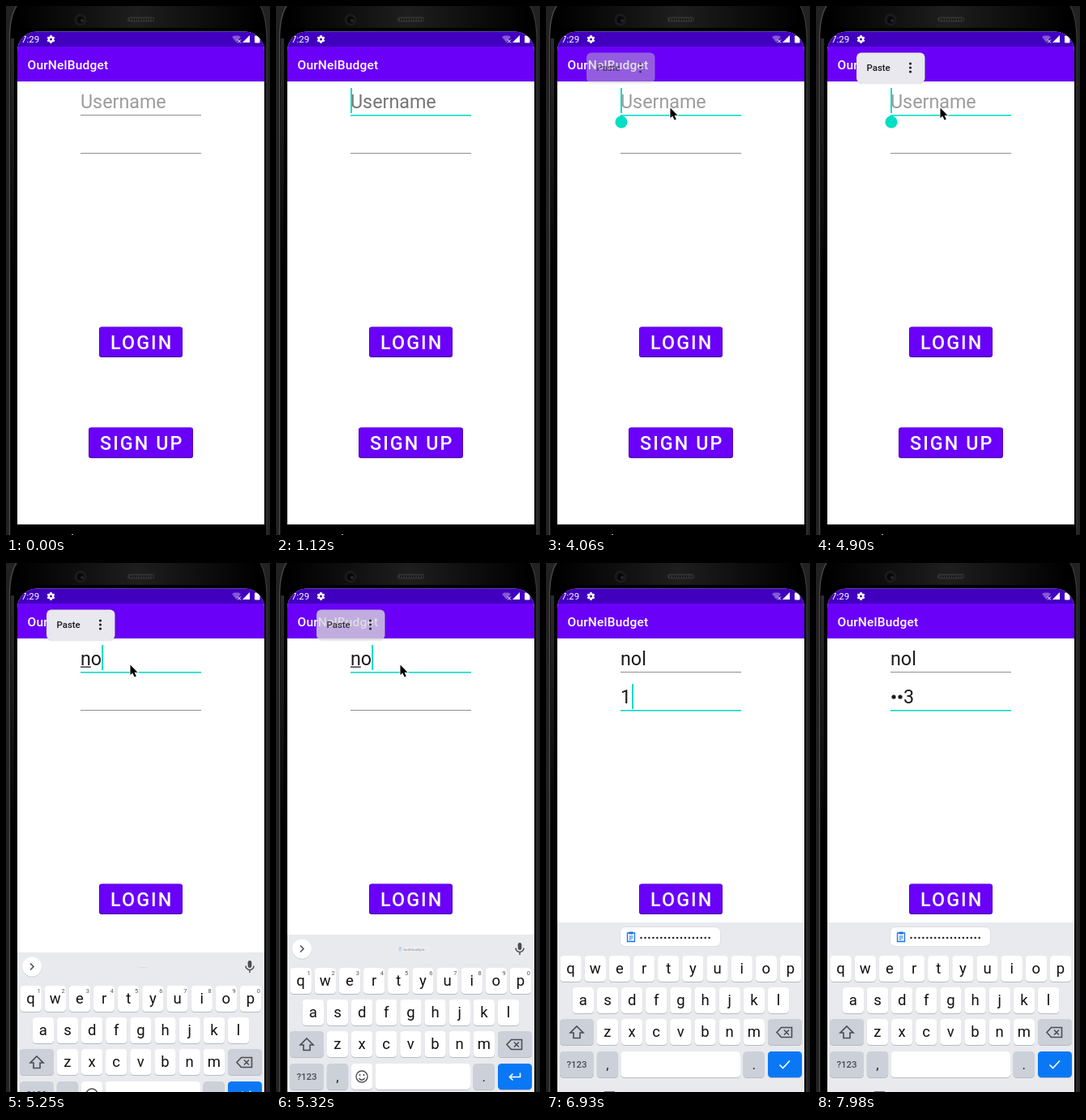
These frames come from a looping animation (326 by 652 pixels, 8 s). An HTML page with a canvas:

```html
<!DOCTYPE html>
<html lang="en">
<head>
<meta charset="utf-8">
<title>Login screen</title>
<style>
html, body { margin: 0; width: 100%; height: 100%; overflow: hidden; background: #000; }
canvas { display: block; }
</style>
</head>
<body>
<canvas id="stage" width="326" height="652"></canvas>
<script>
const ctx = document.getElementById('stage').getContext('2d');
const LOOP = 8000, STEP = 70;
const PURPLE = '#6a00f8', DEEP = '#4100be', TEAL = '#10dac6', INK = '#1c1c1c', GREY = '#8f8f8f';
const FIELD_X = 92, FIELD_END = 241;

const clamp = v => Math.max(0, Math.min(1, v));
const within = (t, a, b) => t >= a && t < b;

function rect(x, y, w, h, color) {
  ctx.fillStyle = color;
  ctx.fillRect(x, y, w, h);
}

function round(x, y, w, h, r, color) {
  ctx.beginPath();
  ctx.roundRect(x, y, w, h, r);
  ctx.fillStyle = color;
  ctx.fill();
}

function disc(x, y, r, color) {
  ctx.beginPath();
  ctx.arc(x, y, r, 0, Math.PI * 2);
  ctx.fillStyle = color;
  ctx.fill();
}

function shape(d, color) {
  ctx.fillStyle = color;
  ctx.fill(new Path2D(d));
}

function stroke(d, color, width = 1.5) {
  ctx.strokeStyle = color;
  ctx.lineWidth = width;
  ctx.stroke(new Path2D(d));
}

function text(str, x, y, size, color, { weight = 400, align = 'left', gap = 0 } = {}) {
  ctx.font = `${weight} ${size}px Roboto, sans-serif`;
  ctx.textAlign = align;
  ctx.letterSpacing = gap + 'px';
  ctx.fillStyle = color;
  ctx.fillText(str, x, y);
  const width = ctx.measureText(str).width;
  ctx.letterSpacing = '0px';
  return width;
}

function fade(x0, y0, x1, y1, ...colors) {
  const g = ctx.createLinearGradient(x0, y0, x1, y1);
  colors.forEach((c, i) => g.addColorStop(i / (colors.length - 1), c));
  return g;
}

function body() {
  rect(0, 0, 326, 652, '#222');
  shape('M13 0 Q5 12 4.5 38 V652 H322 V38 Q321 12 314 0 z', '#000');
  rect(14, 0, 298, 27, fade(14, 0, 312, 0, '#000', '#1e1e1e', '#000'));
  stroke('M13 0 Q5 12 4.5 38 V652', '#484848', 1.4);
  stroke('M314 0 Q321 12 322 38 V652', '#3a3a3a', 1.2);
  rect(6, 40, 4, 290, fade(0, 40, 0, 330, '#2c2c2c', '#000'));
  disc(92, 17, 7.5, '#1b1b1d');
  disc(92, 17, 4.5, '#08080a');
  disc(94, 18, 2, '#25252d');
  round(150, 13.5, 33, 6, 3, '#333');
  for (let x = 153; x < 181; x += 3) rect(x, 15, 1.5, 3, '#151515');
}

function gear(x, y) {
  for (let i = 0; i < 6; i++) {
    ctx.save();
    ctx.translate(x, y);
    ctx.rotate(i * Math.PI / 3);
    rect(-1.3, -4.9, 2.6, 3, '#fff');
    ctx.restore();
  }
  disc(x, y, 3.7, '#fff');
  disc(x, y, 1.5, DEEP);
}

function bars() {
  rect(14, 31, 305, 19, DEEP);
  rect(14, 50, 305, 43, PURPLE);
  text('7:29', 19, 45, 11.5, '#fff');
  gear(55.5, 41);
  shape('M279 38 L282 36.5 H287 L290 38 L284.5 45 z', 'rgba(255,255,255,.35)');
  stroke('M286 41.5 l4 4 m0 -4 l-4 4', '#fff', 1);
  shape('M292 45 L301 36 V45 z', '#fff');
  round(307, 36.5, 6.5, 9, 1, '#fff');
  text('OurNelBudget', 26.5, 78, 15.5, '#fff', { weight: 500, gap: 0.2 });
}

function button(label, x, y, w, h) {
  round(x, y + 0.6, w, h, 3, '#4600a8');
  round(x + 0.8, y + 0.8, w - 1.6, h - 1.4, 2.5, PURPLE);
  text(label, x + 14, y + 28, 23.3, '#fff', { weight: 500, gap: 2.08 });
}

function caret(x, y) {
  rect(x, y, 2, 31, TEAL);
}

function fieldLine(y, focused) {
  rect(FIELD_X, y, FIELD_END - FIELD_X, focused ? 1.6 : 1, focused ? TEAL : GREY);
}

function username(t) {
  fieldLine(134, within(t, 1120, 6510));
  const name = t < 5180 ? '' : t < 5250 ? 'n' : t < 5390 ? 'no' : 'nol';
  let width = 0;
  if (name) {
    width = text(name, FIELD_X, 126, 23.3, INK);
    if (t < 6510) {
      const lined = t < 5390 ? 'n' : t < 5670 ? 'no' : name;
      rect(FIELD_X, 127.5, ctx.measureText(lined).width, 1.3, INK);
    }
  } else {
    const pale = t < 70 || t >= 4060;
    text('Username', FIELD_X, 126, 23.3, pale ? '#9c9c9c' : '#757575');
  }
  if (within(t, 1120, 4410) || within(t, 4900, 6230)) caret(FIELD_X + width, 101);
  if (within(t, 3990, 5180)) {
    disc(93, 143, 7.6, '#00dfc4');
    shape('M93 134 l6 5 h-12 z', '#00dfc4');
  }
}

function password(t) {
  fieldLine(181, within(t, 2380, 3990) || t >= 6510);
  let dots = 0, last = '';
  if (within(t, 2380, 3360)) last = 'p';
  else if (t >= 7490) { dots = 2; last = '3'; }
  else if (t >= 7140) { dots = 1; last = '2'; }
  else if (t >= 6930) last = '1';

  for (let i = 0; i < dots; i++) disc(FIELD_X + 4 + i * 8, 165, 2.6, INK);
  const start = FIELD_X + dots * 8;
  const width = last ? text(last, start, 173, 23.3, INK) + 1 : 0;
  if (within(t, 2380, 2940) || within(t, 3360, 3990) || within(t, 6510, 7980)) {
    caret(start + width, 149);
  }
}

function popup(t) {
  const alpha = t < 5320 ? clamp((t - 3920) / 350) : t < 5390 ? 0.74 : t < 5460 ? 0.35 : 0;
  if (!alpha) return;
  ctx.save();
  ctx.globalAlpha = alpha;
  ctx.shadowColor = 'rgba(0,0,0,.35)';
  ctx.shadowBlur = 2;
  round(50, 57.5, 84.5, 37.5, 6, '#e8e8ee');
  ctx.shadowColor = 'transparent';
  ctx.globalAlpha = Math.sqrt(alpha);
  text('Paste', 62.5, 80, 11.4, '#1a1a1e', { weight: 500 });
  [71, 76, 81].forEach(y => disc(116.5, y, 1.6, '#1a1a1e'));
  ctx.restore();
}

function clipboard(x, y) {
  const blue = '#1a73e8';
  stroke(`M${x - 4.5} ${y - 5} h9 v10.5 h-9 z`, blue, 1.3);
  rect(x - 2.5, y - 6.5, 5, 3, blue);
  stroke(`M${x - 2.5} ${y - 1} h5 m-5 2 h5 m-5 2 h3`, blue, 1);
}

function chip(t, secret) {
  const scale = t < 5250 ? 0 : t < 5320 ? 0.15 : t < 5390 ? 0.38 : t < 5460 ? 0.8 : 1;
  if (!scale) return;
  ctx.save();
  ctx.globalAlpha = scale;
  ctx.translate(169.5, 461);
  ctx.scale(scale, scale);
  ctx.translate(-169.5, -461);
  const x = secret ? 92 : 114, w = secret ? 123 : 111;
  round(x - 0.5, 448.5, w + 1, 24.5, 6.5, '#d2d5db');
  round(x, 449, w, 23.3, 6, '#fff');
  clipboard(x + 13, 461);
  if (secret) {
    for (let i = 0; i < 18; i++) disc(117.5 + i * 4.95, 462, 1.25, '#222');
  } else {
    text('findViewById...', 138, 465, 11.4, '#1a1a1a', { weight: 500 });
  }
  ctx.restore();
}

function key(x, y, w, color = '#fff') {
  round(x, y + 1, w, 32, 4.5, 'rgba(60,65,80,.28)');
  round(x, y, w, 32, 4.5, color);
}

function keyRow(letters, x, y, numbered) {
  [...letters].forEach((c, i) => {
    const left = x + i * 30.15;
    key(left, y, 26.3);
    text(c, left + 13.1, y + 21.5, 18.5, '#111', { align: 'center' });
    if (numbered) text((i + 1) % 10, left + 23, y + 8.5, 7.5, '#555', { align: 'center' });
  });
}

function keyboard(t) {
  if (t < 5110) return;
  const secret = t >= 6580;
  const dark = '#ccd0d8', mark = '#4a4c52';
  ctx.save();
  ctx.translate(0, Math.round(209 * Math.pow(1 - clamp((t - 5040) / 480), 3)));
  rect(14, 443, 305, 209, '#e8eaee');
  chip(t, secret);
  if (!secret) {
    disc(32, 461.2, 12.3, '#d0d3d9');
    disc(32, 460.5, 12, '#fff');
    stroke('M30 456.5 l4 4 l-4 4', mark);
    round(298.7, 453, 4.6, 9, 2.3, mark);
    stroke('M296 459.5 a5 5 0 0 0 10 0 M301 464.5 v3.5', mark);
  }

  keyRow('qwertyuiop', 17.5, 484, !secret);
  keyRow('asdfghjkl', 32.7, 523);
  keyRow('zxcvbnm', 62.8, 562);
  key(17, 562, 42, dark);
  stroke('M38 571 l8 8 h-4 v6.5 h-8 v-6.5 h-4 z', mark, 1.6);
  key(274, 562, 42, dark);
  stroke('M290.5 572.5 h13 v12 h-13 l-5.5 -6 z M294 575.5 l6 6 m0 -6 l-6 6', mark, 1.6);

  key(17, 602, 42, dark);
  text('?123', 38, 622, 11.5, mark, { align: 'center', weight: 500 });
  key(62.8, 602, 26.3, dark);
  text(',', 76, 624, 17, '#222', { align: 'center' });
  if (secret) {
    key(92.5, 602, 147.5);
  } else {
    key(92.9, 602, 26.3);
    key(122.5, 602, 117.5);
    stroke('M99 618 a7 7 0 0 1 14 0 a7 7 0 0 1 -14 0 M102.5 620 q3.5 4.5 7 0', mark, 1.4);
    disc(103.5, 616, 1.1, mark);
    disc(108.5, 616, 1.1, mark);
  }
  key(243.5, 602, 26.3, dark);
  text('.', 256.7, 624, 17, '#222', { align: 'center' });
  key(274, 602, 42, '#0a78f5');
  stroke(secret ? 'M288.5 618.5 l4 4 l8.5 -9' : 'M301.5 613.5 v5 h-13 m4 -4 l-4 4 l4 4', '#fff', 1.6);
  rect(72, 651, 13, 1, '#777');
  ctx.restore();
}

function mouse(x, y) {
  const arrow = `M${x} ${y} v12.5 l2.8 -2.5 l2.3 5 l2.2 -1 l-2.2 -4.8 h3.9 z`;
  stroke(arrow, '#fff', 1.6);
  shape(arrow, '#000');
}

function draw(t) {
  body();
  ctx.save();
  ctx.beginPath();
  ctx.roundRect(14, 31.5, 305, 640, [24, 24, 0, 0]);
  ctx.clip();
  rect(14, 31, 305, 608, '#fff');
  bars();
  button('LOGIN', 115, 395, 103, 37.3);
  button('SIGN UP', 102, 519, 129, 37.6);
  username(t);
  password(t);
  popup(t);
  rect(14, 639, 305, 13, '#000');
  rect(81, 651, 2, 1, '#aaa');
  keyboard(t);
  ctx.restore();
  if (within(t, 2100, 5950)) mouse(153.5, 125.5);
}

const begin = performance.now();
function frame() {
  const t = (performance.now() - begin) % LOOP;
  draw(Math.floor(t / STEP) * STEP);
  requestAnimationFrame(frame);
}
frame();
</script>
</body>
</html>
```
